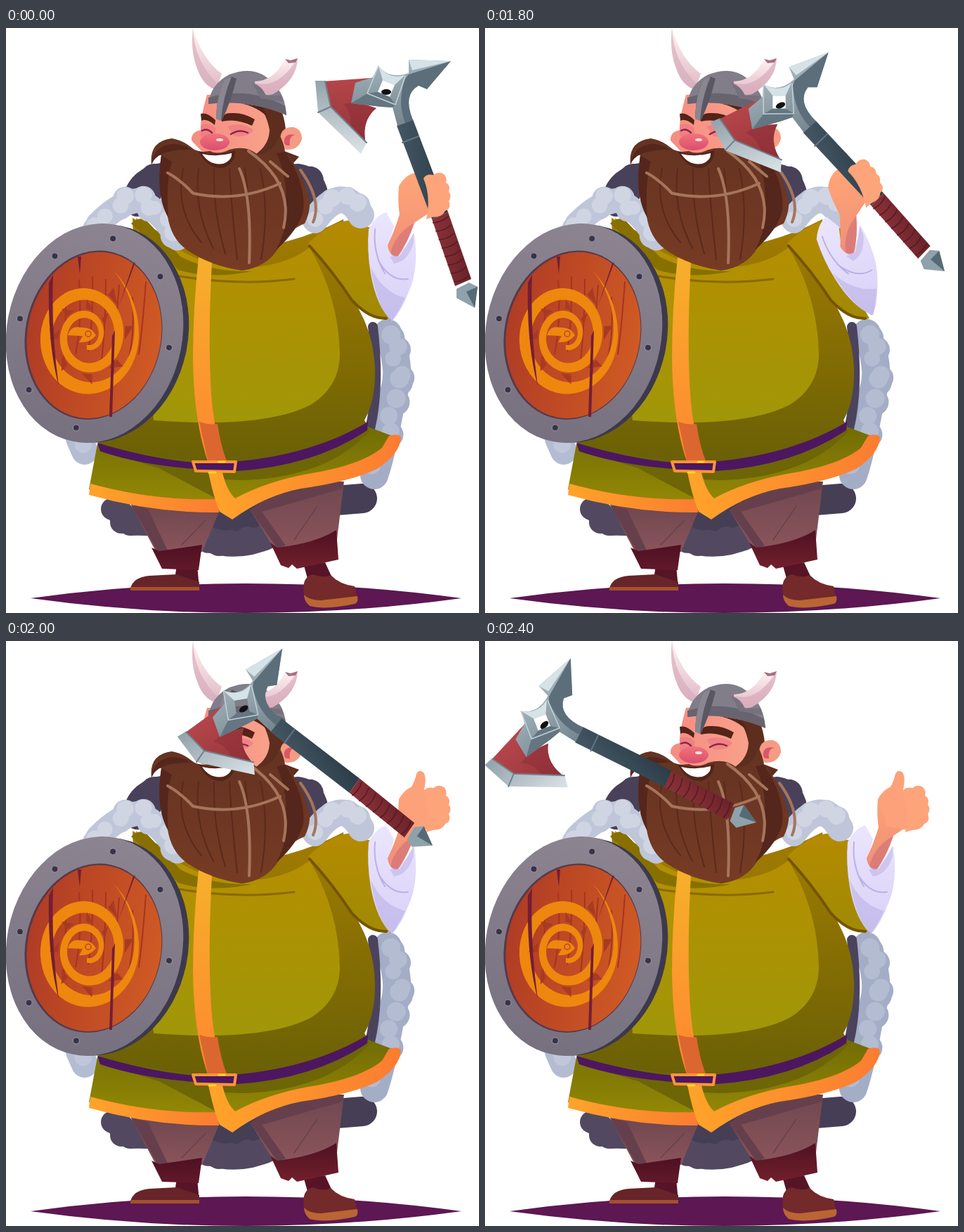
An HTML page that plays this animation: 673 px wide and 832 px high, repeating every 2600 ms.

```html
<!DOCTYPE html>
<html lang="en">
<head>
<meta charset="utf-8">
<title>Viking throwing an axe</title>
<style>
html, body { margin: 0; width: 100%; height: 100%; overflow: hidden; background: #fff; }
svg { display: block; width: 100vw; height: 100vh; }
.line, .fur { fill: none; stroke-linecap: round; stroke-linejoin: round; }
</style>
</head>
<body>
<svg viewBox="0 0 673 832">
<defs id="defs"></defs>
<path fill="#5d1753" d="M35 811Q340 769 648 811Q340 853 35 811Z"/>

<!-- cloak -->
<path fill="#463e55" d="M180 660H480L400 735L290 735Z"/>
<path class="fur" stroke="#524960" stroke-width="36" d="M158 685L177 704Q250 702 290 728Q330 742 375 722"/>
<path class="fur" stroke="#463e55" stroke-width="42" d="M470 672L507 669"/>
<path class="fur" stroke="#a4adc6" stroke-width="40" data-light="#b4bcd2" d="M543 434Q566 488 549 525Q536 600 524 636"/>
<path class="line" stroke="#4b435d" stroke-width="14" d="M522 425Q532 510 518 570"/>
<path class="fur" stroke="#b4bcd2" stroke-width="38" data-light="#c0c7da" d="M104 584L112 602"/>

<!-- legs -->
<path data-mix="#704750 #8d555b" d="M178 678L216 750L279 745L304 686Z"/>
<path fill="#65404c" d="M178 678L216 745L230 743L202 684Z"/>
<path data-mix="#704750 #8d555b" d="M348 686L386 748L470 735L481 645L400 650Z"/>
<path fill="#65404c" d="M348 686L386 740L398 736L364 688L479 655V645H400Z"/>
<path class="line" stroke="#66424c" stroke-width="1.5" d="M250 735L284 700M410 728L443 680"/>
<path fill="#571426" d="M243 764H272L275 797H238ZM424 765L454 760L466 786L435 804Z"/>
<path fill="#672429" d="M177 797Q181 781 204 779L243 777L275 788V797Z"/>
<path fill="#a4512d" d="M177 795H275V800H177Z"/>
<path data-mix="#4d1122 #62192a" d="M207 739L222 769L274 771L279 735L218 744Z"/>
<path fill="#74292a" d="M424 806Q420 780 437 777Q452 783 462 778Q474 791 496 794L500 811L438 820Z"/>
<path fill="#ba6534" d="M424 806Q432 814 448 814L500 808Q502 817 496 819Q455 828 432 822Q424 815 424 806Z"/>
<path data-mix="#4d1122 #72202b" d="M376 732L391 764L402 768L407 763L414 769L473 756L470 714Q440 733 386 739Z"/>

<!-- tunic -->
<path data-mix="#716b05 #988c06" d="M130 592L118 656Q210 682 302 680L320 690Q400 655 470 642Q535 620 557 583L512 566Z"/>
<path fill="#6d6506" d="M130 594Q300 670 430 628Q480 612 517 574L510 562L132 588ZM210 622L297 668L302 635Z"/>
<path data-mix="#ffa429 #fb7c31" data-dir="h" d="M120 648Q210 673 302 670L303 689Q210 690 118 664Z"/>
<path data-mix="#ffa429 #fb7c31" data-dir="h" d="M288 632H308Q314 658 326 669Q370 645 430 634Q505 622 535 597L545 580Q560 576 562 583Q560 606 528 627Q490 645 420 655Q370 664 322 699L304 688Q296 670 288 632Z"/>
<path data-mix="#a37c00 #6a6006" d="M180 270Q320 355 480 272L493 385Q523 430 525 485Q526 530 510 558L517 569Q430 612 320 618Q210 614 130 590L190 560Z"/>
<path data-mix="#b88d00 #a09708" d="M185 270Q250 330 315 340Q390 345 432 312Q474 385 475 465Q474 510 435 535Q370 570 210 558Z"/>
<path fill="#877000" d="M178 278Q190 266 201 275L248 325Q290 347 350 346Q290 358 245 344Z"/>
<path class="line" stroke="#8a6a00" stroke-width="3" d="M247 353Q330 367 410 357"/>
<path data-mix="#f6b02b #ff8530" d="M274 326L293 333Q287 440 292 520Q296 580 314 616L288 619Q267 560 266 470Q266 400 274 326Z"/>
<path fill="#dc6630" d="M275 560Q290 565 301 563Q305 592 314 616L288 619Z"/>
<path fill="#4c1760" d="M130 590Q220 617 290 619Q425 614 515 560L514 572Q440 622 330 630Q210 628 134 602Z"/>
<path class="line" stroke="#ff9435" stroke-width="4" d="M266 617H327L325 631L270 630Z"/>
<path class="line" stroke="#ffd51e" stroke-width="3" d="M303 617H311M289 632H298"/>

<!-- collar -->
<path class="fur" stroke="#494159" stroke-width="40" d="M186 245Q192 215 228 211"/>
<path class="fur" stroke="#494159" stroke-width="38" d="M415 212Q440 216 440 246"/>
<path data-mix="#b58a00 #a08a05" d="M430 306Q460 277 490 273L518 284Q511 352 547 413Q525 420 495 390Q465 346 430 306Z"/>
<path class="line" stroke="#755400" stroke-width="4" d="M432 310Q465 346 492 387Q517 414 541 413"/>
<path class="fur" stroke="#bfc6d9" stroke-width="35" data-light="#d0d5e4" d="M131 279Q162 247 190 245Q222 262 244 299"/>
<path class="fur" stroke="#bfc6d9" stroke-width="38" data-light="#d0d5e4" d="M440 272Q478 220 505 266"/>

<!-- head -->
<path fill="#5d2d1e" d="M345 100L390 112Q403 145 396 175L417 183L402 200L350 180Z"/>
<path fill="#f59b84" d="M390 158Q391 140 409 141Q421 144 421 158Q416 174 399 173Q390 170 390 158Z"/>
<path fill="#d9576a" d="M396 158Q399 149 412 152Q402 153 404 167Q394 169 396 158Z"/>
<path data-mix="#f58d82 #f8a18a" data-dir="h" d="M286 95Q276 130 277 145Q263 148 264 160L278 175L345 185Q374 172 375 145Q370 118 350 95Z"/>
<path fill="#ec7580" opacity=".6" d="M277 139Q287 133 298 142V151L277 155ZM315 140Q335 132 352 145Q346 156 325 154Z"/>
<path class="line" stroke="#8d244a" stroke-width="2.5" d="M279 146Q286 142 293 149M320 151Q332 143 344 149"/>
<path fill="#542419" d="M277 122Q286 119 298 131L297 138Q285 128 278 132ZM307 133Q307 120 321 121Q338 120 354 130L350 139Q327 128 307 133ZM330 106L365 112L375 130Q360 112 330 106Z"/>
<ellipse cx="297" cy="162" rx="21" ry="12" data-mix="#f0747c #dd4d6d"/>
<ellipse cx="304" cy="159" rx="5" ry="2" fill="#ffe0d8"/>
<path data-mix="#643322 #773b24" d="M207 195Q203 161 236 157Q252 160 264 170Q273 178 290 175Q302 181 318 173Q342 166 358 180Q382 178 389 152Q395 162 397 176Q421 203 430 238Q436 255 425 278Q400 288 388 312Q372 340 336 345Q290 338 258 316Q235 300 230 268Q213 232 221 181Q211 177 207 195Z"/>
<path fill="#55261b" d="M207 195Q209 169 235 165Q250 164 264 173Q214 172 207 195ZM221 181Q212 238 231 270Q227 220 236 190ZM385 178Q403 218 397 258Q401 286 384 316Q417 286 423 260Q427 222 397 176Z"/>
<path id="strands" class="line" stroke="#5a2a1c" stroke-width="2"/>
<path class="line" stroke="#a5755b" stroke-width="4" d="M230 206Q247 215 266 235Q330 249 390 221M332 200Q350 240 346 334M345 175Q410 220 395 284M376 190L401 211M419 202Q450 245 437 276"/>
<path fill="#54241b" d="M274 175Q296 184 326 174Q327 192 309 199Q287 201 274 175Z"/>
<path fill="#fff" d="M279 179Q300 184 321 178Q322 188 309 193Q290 196 279 179Z"/>

<!-- helmet -->
<path data-mix="#fff3f2 #e0b9c6" d="M266 0Q279 45 307 65L299 88Q281 82 273 60Q262 34 266 0Z"/>
<path fill="#d6a9ba" opacity=".6" d="M266 0Q268 48 301 79L299 88Q281 82 273 60Q262 34 266 0Z"/>
<path fill="#817d89" d="M288 108Q291 80 318 66Q358 51 381 80Q397 94 399 124Q345 101 288 108Z"/>
<path fill="#67636f" d="M288 99Q345 82 397 111L399 124Q345 101 288 108Z"/>
<path fill="#5a5664" d="M321 69L328 72Q320 105 307 132L299 129Q300 94 311 73Z"/>
<path fill="#8a8691" d="M311 73L321 69Q308 100 306 132L299 129Q300 94 311 73Z"/>
<path data-mix="#fff3f2 #e0b9c6" d="M354 76Q382 75 397 44L405 46L415 43Q414 74 380 94Q368 98 355 88Z"/>
<path fill="#d5a4b6" opacity=".6" d="M354 78Q387 88 415 43Q414 74 380 94Q368 98 355 88Z"/>
<path fill="#aa6e82" d="M397 44L405 46L415 43L412 49L402 50Z"/>
<path fill="#77717e" d="M350 78Q364 82 370 96H392L395 105L362 100Z"/>

<!-- shield -->
<g transform="rotate(11 126 434)">
  <ellipse cx="134" cy="433" rx="125" ry="156" fill="#3d394d"/>
  <ellipse cx="126" cy="434" rx="125" ry="157" data-mix="#8c8490 #77707f"/>
  <ellipse cx="125" cy="437" rx="97" ry="121" fill="#56394a"/>
  <ellipse cx="126" cy="437" rx="95" ry="119" data-mix="#b03c25 #cf5a24" data-dir="h"/>
  <g id="rivets" fill="#37334a" stroke="#9b94a0"></g>
</g>
<path id="grain" class="line" stroke="#a83322" stroke-width="2"/>
<path id="spiral" fill="#ee870e"/>
<path id="thorns" fill="#a93a22"/>
<path fill="#ee870e" d="M88 437Q92 422 107 426Q122 425 128 437Q120 448 104 447L109 438Z"/>
<circle cx="117" cy="435" r="4" fill="none" stroke="#b94920" stroke-width="1.5"/>
<path fill="#741d35" d="M61 362L67 351Q64 430 75 509Q59 450 61 362ZM181 335L184 333L160 397ZM151 438L155 430L151 553H147ZM102 325H107L105 350Z"/>

<!-- throwing arm -->
<g id="arm">
  <path fill="#73500a" d="M517 282Q507 348 547 416L554 408L528 330Z"/>
  <path data-mix="#ebe6fe #d8d0f6" d="M516 286Q527 266 541 262L552 282L544 312L560 325L581 291Q588 343 573 375Q563 402 549 417Q527 396 519 350Q513 316 516 286Z"/>
  <path fill="#aaa0db" opacity=".4" d="M519 340Q535 375 568 384Q558 404 549 417Q527 396 519 340ZM546 325Q563 326 580 291V306Q571 333 552 335Z"/>
  <path class="line" stroke="#bbb1e6" stroke-width="2" d="M525 286Q522 321 539 349M530 331Q547 361 572 357"/>
  <path data-mix="#ffa677 #f08e78" d="M559 225Q569 207 584 206L603 216L602 263L581 277Q572 305 558 324Q545 325 543 309Q553 288 560 265Q557 245 559 225Z"/>
  <path fill="#c86978" opacity=".5" d="M581 277Q572 305 558 324Q550 327 547 320Q554 292 581 277Z"/>
  <g id="thumb">
    <path fill="#fda17a" d="M562 225Q579 211 584 189Q588 181 595 188Q599 199 594 214L612 240L606 270L571 263Z"/>
    <use href="#fingers"/>
  </g>
</g>

<g id="axe">
  <path data-mix="#b5464a #93343a" d="M450 76L520 71L500 105L527 114Q505 132 512 165L460 113Z"/>
  <path fill="#842933" opacity=".4" d="M500 105L527 114Q505 132 512 165L490 146Q494 122 480 108Z"/>
  <path data-mix="#93a2ab #dbe4e8" d="M440 75H454L462 112L513 163L505 179L444 120Z"/>
  <path class="line" stroke="#6f818b" stroke-width="2" d="M454 76L462 112L513 163M444 120L462 112"/>
  <path data-mix="#445764 #2b3c47" data-dir="h" d="M556 139L579 130L629 262L606 272Z"/>
  <path class="line" stroke="#627783" stroke-width="2" d="M564 163L587 154"/>
  <path data-mix="#8c3238 #692229" data-dir="h" d="M606 272L629 262L662 357L639 367Z"/>
  <path id="wraps" fill="none" stroke="#521a25" stroke-width="1.5"/>
  <path fill="#8fa2ab" d="M641 371L659 362L671 368L667 398L641 384Z"/>
  <path fill="#566a75" d="M655 375L671 368L667 398Z"/>
  <path data-mix="#a5b4bd #74868f" fill-rule="evenodd" d="M530 54Q546 74 573 64V45L633 47L599 87L587 82Q564 95 579 131L557 139L550 113L534 112L491 107L497 78L522 70ZM536 74L529 91L546 98L553 81Z"/>
  <path fill="#5b6e79" d="M573 66L633 47L599 87L587 82Q564 95 579 131L568 135Q556 105 568 72Z"/>
  <path fill="#d5e2e7" d="M573 45L633 47L578 60ZM530 54Q546 74 568 67L553 81L536 74Z"/>
  <path fill="#637681" d="M491 107L514 93L529 91L546 98L554 109L550 113L534 112Z"/>
  <path class="line" stroke="#c3d0d6" stroke-width="1.5" d="M530 54L514 93L554 109L568 69"/>
  <ellipse cx="541" cy="91" rx="7" ry="4" fill="#111"/>
</g>
<g id="grasp">
  <path id="fingers" fill="#fda47a" d="M594 214Q598 207 608 209Q616 203 623 208Q628 213 626 220Q633 224 630 233Q635 239 630 246Q634 257 625 260Q621 269 607 269L598 272Q605 240 594 214Z"/>
</g>
</svg>
<script>
const $ = id => document.getElementById(id);
const setPath = (id, d) => $(id).setAttribute('d', d);
const times = (n, make) => Array.from({ length: n }, (_, i) => make(i)).join('');
let seed = 11;
const rand = () => (seed = seed * 16807 % 2147483647) / 2147483647;

// Two-colour fills
document.querySelectorAll('[data-mix]').forEach((el, i) => {
  const [from, to] = el.dataset.mix.split(' '), flat = el.dataset.dir === 'h';
  $('defs').innerHTML += `<linearGradient id="mix${i}" x2="${+flat}" y2="${+!flat}">` +
    `<stop stop-color="${from}"/><stop offset="1" stop-color="${to}"/></linearGradient>`;
  el.setAttribute('fill', `url(#mix${i})`);
});

// Random round tufts along each fur line, with lighter tops
for (const el of document.querySelectorAll('.fur')) {
  const w = +el.getAttribute('stroke-width'), light = el.dataset.light;
  let tufts = '', tops = '';
  for (let s = 0; s <= el.getTotalLength(); s += w * 0.5) {
    const p = el.getPointAtLength(s), jitter = () => (rand() - 0.5) * w * 0.4;
    const x = p.x + jitter(), y = p.y + jitter(), r = w * (0.4 + 0.12 * rand());
    tufts += `<circle cx="${x}" cy="${y}" r="${r}" fill="${el.getAttribute('stroke')}"/>`;
    if (light) tops += `<circle cx="${x}" cy="${y - r * 0.25}" r="${r * 0.7}" fill="${light}"/>`;
  }
  el.insertAdjacentHTML('afterend', tufts + tops);
}

// Spiral with u turns from the middle, tapering to a tail
const END = 2.43;
const half = u => (3.5 + 3.2 * u) * Math.min(1, (END - u) * 2);
function spiralPoint(u, off) {
  const r = 16 + 29 * u + 500 * Math.max(0, u - 2.25) ** 2 + off, a = u * 2 * Math.PI;
  return [115 + 0.87 * r * Math.sin(a), 438 + r * Math.cos(a)];
}
const edge = side => Array.from({ length: 122 }, (_, i) => spiralPoint(i * END / 121, side * half(i * END / 121)));
setPath('spiral', 'M' + [...edge(1), ...edge(-1).reverse()].join('L') + 'Z');
setPath('thorns', times(9, i => {
  const u = 0.35 + i * 0.13, base = half(u) + 3;
  return `M${spiralPoint(u - 0.025, base)}L${spiralPoint(u + 0.02, base + 14)}L${spiralPoint(u + 0.025, base)}Z`;
}));

$('rivets').innerHTML = times(7, i => {
  const a = -i * Math.PI / 4;
  return `<circle cx="${126 + 108 * Math.cos(a)}" cy="${434 + 137 * Math.sin(a)}" r="4.5"/>`;
});
setPath('grain', times(7, i => `M${85 + i * 19} ${350 + rand() * 40}q${rand() * 16 - 8} 60 ${-4 - i} ${90 + rand() * 40}`));
setPath('strands', times(6, i => `M${252 + i * 22} 200Q${240 + i * 27} 260 ${278 + i * 17} ${305 + 8 * Math.min(i, 3)}`));
setPath('wraps', times(8, i => `M${607 + i * 4.3} ${277 + i * 12}q12 0 22 -9`));

function draw() {
  const t = performance.now() % 2600;
  const step = t < 1600 ? 0 : 1 + Math.floor((t - 1600) / 200);
  const held = step < 3, k = step - 3;
  const swing = `rotate(${-22.4 * (step / 2) ** 1.27} 529 405)`;
  // Once released, the pommel follows a parabola
  const flight = `translate(${607 - 133.5 * k + 11.5 * k * k} ${291 - 81.5 * k + 32.5 * k * k}) ` +
    `rotate(${Math.max(-43, -31.8 - 11.2 * k)}) translate(-667 -398)`;
  $('axe').setAttribute('transform', held ? swing : flight);
  for (const id of ['arm', 'grasp']) $(id).setAttribute('transform', held ? swing : '');
  $('grasp').setAttribute('visibility', held ? 'visible' : 'hidden');
  $('thumb').setAttribute('visibility', held ? 'hidden' : 'visible');
  $('fingers').setAttribute('visibility', 'inherit');
  requestAnimationFrame(draw);
}
draw();
</script>
</body>
</html>
```
